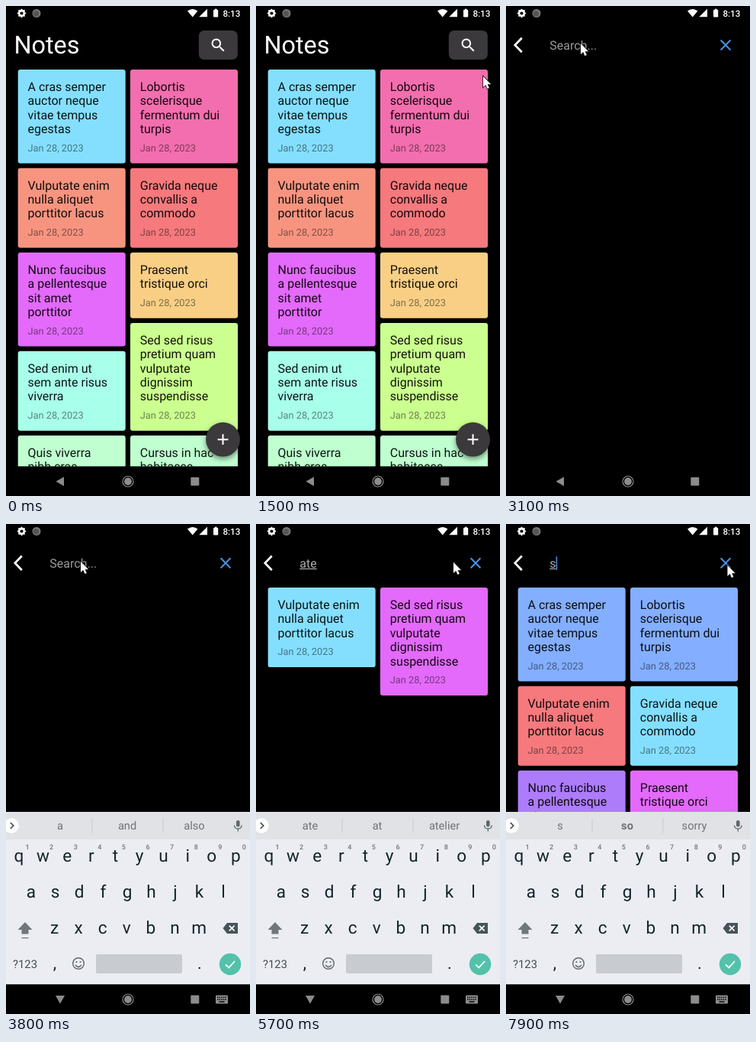
An HTML page with a canvas for the animation above (8 s loop, 320 px wide and 640 px high).

```html
<!DOCTYPE html>
<html lang="en">
<head>
<meta charset="utf-8">
<title>Notes</title>
<style>
html, body { margin: 0; width: 100%; height: 100%; overflow: hidden; background: #000; }
canvas { display: block; }
</style>
</head>
<body>
<canvas id="stage" width="320" height="640"></canvas>
<script>
const ctx = document.getElementById('stage').getContext('2d');
const LOOP = 8000, OPEN_SEARCH = 2150, FOCUS = 3250, KEYBOARD = 3280;
const TEXT_X = 57.3, BODY = 16, LINE = 18.4;

const C = {
  sky: '#84dfff', pink: '#f36eae', salmon: '#f79480', red: '#f5797d', magenta: '#e36afa',
  orange: '#f8cf85', mint: '#a8ffea', lime: '#cbff8f', green: '#bfffd0', purple: '#ad7cfa',
  yellow: '#fbe587', blue: '#84aeff', accent: '#4a8cdc', button: '#3b393c', nav: '#8c8c8c',
  key: '#13252b', query: '#acacac'
};

const NOTES = [
  'A cras semper|auctor neque|vitae tempus|egestas',
  'Lobortis|scelerisque|fermentum dui|turpis',
  'Vulputate enim|nulla aliquet|porttitor lacus',
  'Gravida neque|convallis a|commodo',
  'Nunc faucibus|a pellentesque|sit amet|porttitor',
  'Praesent|tristique orci',
  'Sed sed risus|pretium quam|vulputate|dignissim|suspendisse',
  'Sed enim ut|sem ante risus|viverra',
  'Quis viverra|nibh cras|pulvinar mattis',
  'Cursus in hac|habitasse|nunc dictum'
].map(s => s.split('|'));

const HOME_COLORS = 'sky pink salmon red magenta orange lime mint green green'.split(' ');

// Each edit of the search field restarts the caret blink.
const EDITS = [
  { at: FOCUS, text: '', hints: ['a', 'and', 'also'] },
  { at: 4300, text: 'a', hints: ['a', 'and', 'also'], colors: 'salmon lime sky purple pink yellow' },
  { at: 4600, text: 'at', hints: ['at', 'attached', 'attend'], colors: 'magenta purple yellow' },
  { at: 4980, text: 'ate', hints: ['ate', 'at', 'atelier'], colors: 'sky magenta' },
  { at: 6400, text: '', hints: ['a', 'and', 'also'] },
  { at: 7600, text: 's', hints: ['s', 'so', 'sorry'], bold: 1, colors: 'blue blue red sky purple magenta' }
];

const POINTER = [
  [1500, 298, 92], [1900, 275, 46], [2400, 275, 46], [2800, 68, 60], [3100, 98, 49],
  [5150, 98, 49], [5700, 259, 50], [5900, 281, 51], [6200, 290.5, 54]
];

const SEARCH_ICON = new Path2D('M15.5 14h-.79l-.28-.27A6.471 6.471 0 0016 9.5 6.5 6.5 0 109.5 16c1.61 0 3.09-.59 4.23-1.57l.27.28v.79l5 4.99L20.49 19l-4.99-5zm-6 0C7.01 14 5 11.99 5 9.5S7.01 5 9.5 5 14 7.01 14 9.5 11.99 14 9.5 14z');
const POINTER_SHAPE = new Path2D('M0 0V14L3.2 11L5.4 16L7.8 15L5.6 10.2H10Z');

const progress = (t, from, to) => Math.min(1, Math.max(0, (t - from) / (to - from)));
const ease = p => p * p * (3 - 2 * p);

function text(str, x, y, size, color, { weight = 400, align = 'left' } = {}) {
  ctx.font = `${weight} ${size}px Roboto, sans-serif`;
  ctx.textRendering = 'geometricPrecision';
  ctx.textAlign = align;
  ctx.fillStyle = color;
  ctx.fillText(str, x, y);
}

function rect(x, y, w, h, color, r = 0) {
  ctx.fillStyle = color;
  ctx.beginPath();
  ctx.roundRect(x, y, w, h, r);
  ctx.fill();
}

function disc(x, y, r, color) {
  ctx.fillStyle = color;
  ctx.beginPath();
  ctx.arc(x, y, r, 0, 7);
  ctx.fill();
}

function ring(x, y, r, color, width) {
  ctx.strokeStyle = color;
  ctx.lineWidth = width;
  ctx.beginPath();
  ctx.arc(x, y, r, 0, 7);
  ctx.stroke();
}

function poly(color, ...pts) {
  ctx.fillStyle = color;
  ctx.beginPath();
  pts.forEach(p => ctx.lineTo(...p));
  ctx.fill();
}

function stroke(path, color, width) {
  ctx.strokeStyle = color;
  ctx.lineWidth = width;
  ctx.stroke(new Path2D(path));
}

function clipped(x, y, w, h, draw) {
  ctx.save();
  ctx.beginPath();
  ctx.rect(x, y, w, h);
  ctx.clip();
  draw();
  ctx.restore();
}

function card(lines, x, y, color) {
  rect(x, y, 141, 48.9 + LINE * lines.length, color, 3.2);
  lines.forEach((line, i) =>
    text(line, x + 12.8, y + 27.9 + LINE * i, BODY, 'rgba(0,0,0,.92)'));
  text('Jan 28, 2023', x + 12.8, y + 33 + LINE * lines.length, 12.8, 'rgba(0,0,0,.48)');
}

// Masonry: every card goes to the shorter column.
function grid(notes, colors) {
  const bottom = [83, 83];
  notes.forEach((lines, i) => {
    const col = bottom[1] < bottom[0] - 1 ? 1 : 0;
    card(lines, col ? 163 : 15.7, bottom[col], C[colors[i % colors.length]]);
    bottom[col] += 55.1 + LINE * lines.length;
  });
}

function statusBar() {
  ring(20.5, 9.5, 3.4, '#fff', 2.6);
  for (let i = 0; i < 8; i++) {
    const a = i * Math.PI / 4;
    disc(20.5 + 4.7 * Math.cos(a), 9.5 + 4.7 * Math.sin(a), 1.1, '#fff');
  }
  disc(40, 9.5, 5.5, '#777');
  disc(39.4, 10, 3.8, '#555');
  ctx.fillStyle = '#fff';
  ctx.fill(new Path2D('M238 6.5Q244.7 1.5 251.4 6.5L244.7 14.5Z'));
  poly('#fff', [264, 3.8], [264, 14.3], [253.2, 14.3]);
  rect(272, 5, 6.2, 9.6, '#fff', 0.8);
  rect(273.7, 3.7, 2.8, 2, '#fff');
  text('8:13', 284.4, 13.6, 11.6, '#fff', { weight: 500 });
}

function navBar(keyboardOpen) {
  rect(0, 601.5, 320, 38.5, '#000');
  if (keyboardOpen) {
    poly(C.nav, [65, 616], [77, 616], [71, 626.5]);
    rect(275, 615.5, 16, 11, C.nav, 1.2);
    for (let i = 0; i < 10; i++) rect(277 + i % 5 * 2.6, 617.6 + (i / 5 | 0) * 2.7, 1.5, 1.5, '#000');
    rect(279.5, 623.3, 7, 1.4, '#000');
  } else {
    poly(C.nav, [76, 615], [76, 627], [65.5, 621]);
  }
  disc(160, 621, 4.9, C.nav);
  ring(160, 621, 7, C.nav, 1.2);
  rect(242.3, 615.5, 11, 11, C.nav, 1);
}

function homePage(t) {
  text('Notes', 10.4, 62.3, 32.4, '#fff');
  rect(252.8, 32, 51, 38, C.button, 7);
  const press = progress(t, 1950, 2080);
  ctx.save();
  ctx.translate(266.6, 39.6);
  ctx.scale(0.97, 0.97);
  ctx.fillStyle = '#fff';
  ctx.fill(SEARCH_ICON);
  ctx.restore();
  if (press) {
    rect(252.8, 32, 51, 38, `rgba(255,255,255,${0.1 * press})`, 7);
    clipped(252.8, 32, 51, 38, () => disc(275, 47, 3 + (t - 1950) * 0.06, 'rgba(255,255,255,.24)'));
  }

  clipped(0, 76, 320, 525.5, () => {
    grid(NOTES, HOME_COLORS);
    ctx.shadowColor = 'rgba(0,0,0,.45)';
    ctx.shadowBlur = 7;
    ctx.shadowOffsetY = 3;
    disc(284.5, 566.2, 22.4, C.button);
    ctx.shadowColor = 'transparent';
    stroke('M277.6 566.2H291.4M284.5 559.3V573.1', '#fff', 2);
  });
}

function searchPage(t, edit) {
  stroke('M20.8 41.8L11.8 51L20.8 60.2', '#fff', 2.7);
  stroke('M281.6 44.6L294.4 57.4M294.4 44.6L281.6 57.4', C.accent, 2.1);

  const splash = progress(t, 6200, 6500);
  if (splash && t < 6750) {
    disc(288, 51, 8 + 19 * splash, `rgba(255,255,255,${0.16 * (1 - progress(t, 6450, 6750))})`);
  }

  const query = edit ? edit.text : '';
  text(query || 'Search...', TEXT_X, 56.6, BODY, query ? C.query : '#9a9a9a');
  if (!edit) return;
  const width = query ? ctx.measureText(query).width : 0;
  if (query) rect(TEXT_X, 58, width, 1.2, C.query);
  if ((t - edit.at) % 1000 < 500) rect(TEXT_X + width, 42.5, 1.6, 17.5, C.accent);
  if (query) {
    const found = NOTES.filter(lines => lines.join(' ').toLowerCase().includes(query));
    clipped(0, 76, 320, 300, () => grid(found, edit.colors.split(' ')));
  }
}

function keyRow(keys, x, y, step, digits) {
  [...keys].forEach((key, i) => {
    text(key, x + i * step, y, 22.6, C.key, { align: 'center' });
    if (digits) text(String((i + 1) % 10), x + 11 + i * step, 425.2, 9, '#70767a', { weight: 500, align: 'center' });
  });
}

function keyboard(edit) {
  const grey = '#5d676c';
  rect(0, 376, 320, 226, '#ecedf2');
  rect(0, 376, 320, 36, '#e0e2e6');
  disc(7, 394, 9.8, '#fff');
  stroke('M5.8 390L9.8 394L5.8 398', '#444', 1.6);
  edit.hints.forEach((word, i) =>
    text(word, 71 + 88 * i, 399, 14.6, '#6e7276', { align: 'center', weight: edit.bold === i ? 700 : 400 }));
  rect(112.5, 384.5, 1, 19, '#c6c9cd');
  rect(205.5, 384.5, 1, 19, '#c6c9cd');
  rect(302, 387, 4.6, 8.6, grey, 2.3);
  stroke('M299.4 393.5Q299.8 398 304.3 398T309.2 393.5M304.3 398V401.5', grey, 1.3);

  keyRow('qwertyuiop', 17, 441, 31.6, true);
  keyRow('asdfghjkl', 33, 488, 31.5);
  keyRow('zxcvbnm', 63.5, 535, 31.6);

  poly('#70777b', [25, 520], [34.5, 530], [29.5, 530], [29.5, 535.5], [20.5, 535.5], [20.5, 530], [15.5, 530]);
  rect(20.5, 540, 9, 1.3, '#70777b');
  poly('#46545a', [284.5, 528], [290, 521], [304, 521], [304, 535], [290, 535]);
  stroke('M292.8 524.6L299.6 531.4M299.6 524.6L292.8 531.4', '#fff', 1.6);

  text('?123', 9, 580, 14.8, '#424e53');
  text(',', 64, 580.5, 22, C.key, { align: 'center' });
  ring(95, 574, 7.3, grey, 1.4);
  disc(92.4, 572, 1.1, grey);
  disc(97.6, 572, 1.1, grey);
  stroke('M91 576Q95 581 99 576', grey, 1.4);
  rect(118, 562, 113, 25, '#c8cbd0', 2);
  text('.', 254, 580.5, 22, C.key, { align: 'center' });
  disc(294, 575, 14.2, '#54c1ab');
  stroke('M288 575.5L292.2 579.5L300 571', '#fff', 1.8);
}

function pointer(t) {
  if (t < POINTER[0][0]) return;
  const i = POINTER.findLastIndex(p => p[0] <= t);
  const [t0, x0, y0] = POINTER[i];
  const [t1, x1, y1] = POINTER[i + 1] || [t0 + 1, x0, y0];
  const p = ease(progress(t, t0, t1));
  ctx.save();
  ctx.translate(x0 + (x1 - x0) * p, y0 + (y1 - y0) * p);
  ctx.strokeStyle = '#111';
  ctx.lineWidth = 1.6;
  ctx.stroke(POINTER_SHAPE);
  ctx.fillStyle = '#fff';
  ctx.fill(POINTER_SHAPE);
  ctx.restore();
}

function page(alpha, draw) {
  if (alpha <= 0) return;
  ctx.globalAlpha = alpha;
  draw();
  ctx.globalAlpha = 1;
}

function frame() {
  const t = performance.now() % LOOP;
  const edit = EDITS.findLast(e => e.at <= t);
  const opened = progress(t, OPEN_SEARCH, OPEN_SEARCH + 150);

  rect(0, 0, 320, 640, '#000');
  page(1 - opened, () => homePage(t));
  page(opened, () => searchPage(t, edit));
  const rise = 1 - (1 - progress(t, KEYBOARD, KEYBOARD + 300)) ** 3;
  if (rise) {
    clipped(0, 0, 320, 601.5, () => {
      ctx.translate(0, 226 * (1 - rise));
      keyboard(edit);
    });
  }
  statusBar();
  navBar(t >= KEYBOARD);
  pointer(t);
  requestAnimationFrame(frame);
}
frame();
</script>
</body>
</html>
```
